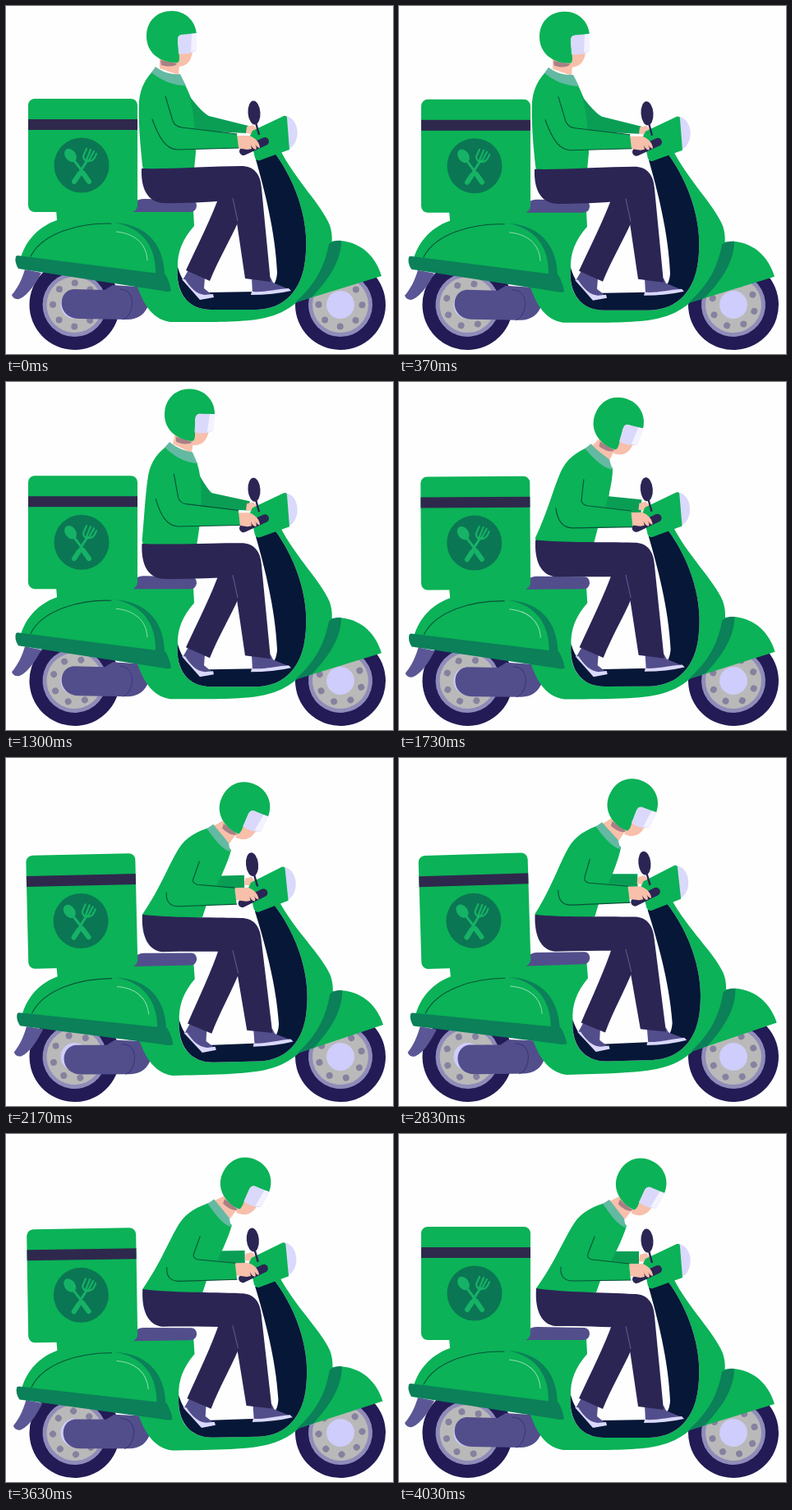
Animation of 471x424 px, one loop 4060 ms. Source, as an HTML page:

```html
<!DOCTYPE html>
<html lang="en">
<head>
<meta charset="utf-8">
<title>Scooter delivery</title>
<style>
  html, body { margin: 0; width: 100%; height: 100%; overflow: hidden; background: #fefefe; }
  svg { display: block; width: 100vw; height: 100vh; }
  .green { fill: #0bb257; }
  .shade { fill: #0b8059; }
  .far { fill: #0a9e55; }
  .navy { fill: #2b2554; }
  .metal { fill: #524e8c; }
  .pale { fill: #dad8fb; }
  .skin { fill: #f8bfaa; }
  .line { fill: none; stroke: #075238; stroke-width: 1.1; stroke-linecap: round; }
  .tool { fill: none; stroke: #16b266; stroke-linecap: round; }
</style>
</head>
<body>
<svg viewBox="0 0 471 424">
  <defs>
    <g id="wheel">
      <circle r="55" fill="#221b55"/>
      <circle r="39" fill="#8f8cba"/>
      <circle r="34" fill="#bab9b9"/>
      <circle r="26.5" fill="none" stroke="#85819f" stroke-width="8" stroke-linecap="round"
        pathLength="80" stroke-dasharray="0 10"/>
      <circle r="17" fill="#cecdfb"/>
    </g>
  </defs>

  <g class="spin" data-x="83.5" data-y="364"><use href="#wheel"/></g>
  <g class="spin" data-x="407" data-y="364"><use href="#wheel"/></g>

  <g id="ride">
    <!-- exhaust and engine -->
    <path fill="#5b5796" d="M23,321 L43,325 C37,336 28,352 16,357 Q9,358 7,352 C14,344 19,334 23,321 Z"/>
    <path class="metal" d="M82,345 L120,346 L130,340 L160,342 L174,362 C170,376 160,382 148,382 L88,381 C62,380 62,347 82,345 Z"/>
    <path fill="none" stroke="#3b3577" d="M138,345 C152,345 155,358 153,367 Q150,380 142,382"/>

    <!-- body -->
    <path class="green" d="M17,310 C22,290 36,270 62,261 L61,248 L228,249 L229,268 C215,284 208,300 209,320
      C206,350 222,370 250,370 L305,370 C340,369 360,345 364,310 C370,270 357,220 327,179 L333,174
      C352,212 384,242 394,267 C401,288 394,308 380,330 C362,356 346,373 315,380 C290,386 240,385 200,385
      C180,382 168,366 160,342 Z"/>
    <path fill="#071738" d="M209,318 C206,350 222,370 250,370 L305,370 C340,369 360,345 364,310
      C370,270 357,220 327,179 L304,187 C314,222 328,275 330,325 C329,340 322,348 305,348 L248,349
      C222,349 214,335 209,318 Z"/>
    <path class="shade" d="M132,264 C167,266 192,286 193,328 L182,326 C183,296 168,270 132,264 Z"/>
    <path class="line" d="M30,305 C45,276 90,264 128,265"/>
    <path fill="none" stroke="#8ddcae" d="M134,275 C156,277 171,289 172,310"/>
    <path class="shade" d="M14,304 L194,327 Q199,336 201,347 Q198,349 190,347 L15,320 Q10,312 12,305 Z"/>
    <path class="green" d="M394,287 L408,286 C434,289 450,306 457,329 L353,361 Z"/>
    <path class="shade" d="M393,290 Q399,285 408,286 C408,314 388,338 372,355 L352,361 C378,338 388,316 393,290 Z"/>

    <!-- seat and box -->
    <path class="metal" d="M155,251 L157,239 Q161,235 168,235 L226,236 Q232,237 232,244 Q231,251 224,251 Z"/>
    <rect class="green" x="27" y="113" width="133" height="138" rx="8"/>
    <rect x="27" y="138" width="133" height="13" fill="#2f284d"/>
    <circle fill="#0b7653" cx="92" cy="194" r="33.5"/>
    <ellipse cx="78.5" cy="182" rx="6.5" ry="9" transform="rotate(-36 78.5 182)" fill="#16b266"/>
    <path class="tool" stroke-width="3" d="M82,187 L94,203"/>
    <path class="tool" stroke-width="6" d="M94,204 L101,214"/>
    <path class="tool" stroke-width="3" d="M99,188 L90,202"/>
    <path class="tool" stroke-width="6" d="M89,205 L83,214"/>
    <path class="tool" stroke-width="2.2" d="M98,174 L94,183 Q95,190 101,189 Q107,189 110,180 M103,175 L98,187 M107,177 L101,188"/>

    <!-- rider, upper part behind the handlebar -->
    <path id="farArm" class="far"/>
    <path class="skin" d="M293,147 L301,145 L306,151 L300,156 L292,155 Z"/>
    <path class="pale" d="M341,134 C359,138 359,170 342,175 Z"/>
    <path class="green" d="M297,158 L300,152 L338,134 Q342,133 342,137 L345,175 L309,188 Q305,189 303,185 Z"/>
    <path id="neck" class="skin"/>
    <path id="jacket" class="green"/>
    <path id="collar" fill="#63b9a2"/>
    <g id="head">
      <path fill="#a97f86" d="M188,66 L209,70 Q203,76 189,72 Z"/>
      <path class="skin" d="M206,50 L227,52 C227,66 221,74 208,74 Z"/>
      <path class="green" d="M208,69 C186,69 171,56 171,37 C171,18 184,6 202,6 C218,6 231,18 232,35
        L214,35 Q209,36 209,42 L211,63 Q211,69 208,69 Z"/>
      <path class="pale" d="M213,35 L232,33 L232,54 Q222,60 210,58 L209,40 Q209,36 213,35 Z"/>
      <path fill="#f3f2ff" d="M226,34 L232,33 L232,54 L225,56 Z"/>
    </g>

    <!-- legs -->
    <path class="metal" d="M223,320 L242,331 L241,344 L252,353 L238,356 L215,334 Z"/>
    <path class="pale" d="M214,333 L218,333 C225,344 232,351 242,352 L252,351 L253,355 L236,358 Z"/>
    <path class="metal" d="M299,331 L322,331 L325,337 L344,345 L300,350 Z"/>
    <path class="pale" d="M299,348 C315,349 328,345 344,344 L347,347 Q325,352 298,352 Z"/>
    <path class="navy" d="M260,230 C250,258 234,290 219,322 L248,335 C258,310 273,285 283,262 L283,230 Z"/>
    <path id="pants" class="navy"/>
    <path fill="none" stroke="#6962a0" stroke-width=".9" d="M276,234 L282,262"/>

    <!-- handlebar, near arm and hand -->
    <ellipse class="navy" cx="302" cy="130" rx="7.5" ry="14.5" transform="rotate(-4 302 130)"/>
    <path fill="none" stroke="#2b2554" stroke-width="2.4" d="M304,142 L308,157"/>
    <path fill="none" stroke="#2b2554" stroke-width="10" stroke-linecap="round" d="M289,177 L315,165"/>
    <path class="skin" d="M280,158 L296,158 C305,161 309,168 309,173 Q306,173 303,168 Q306,173 304,175 Q300,174 298,169 L299,174 L294,175 L281,173 Z"/>
    <path id="nearArm" class="green"/>
    <path id="armTop" class="line"/>
    <path id="armBottom" class="line"/>
  </g>
</svg>
<script>
const LOOP = 4060, LEAN = 29, HIP = [202, 229];
const $ = id => document.getElementById(id);

// Each shape: upright outline, leaning outline
const shapes = {
  neck: [
    'M187,63 L211,68 L210,84 L187,76 Z',
    'M268,76 L284,92 L275,104 L256,82 Z'],
  collar: [
    'M182,74 C192,82 205,84 212,83 L219,97 C203,97 188,90 177,81 Z',
    'M256,80 C262,88 268,95 274,103 L276,114 C266,111 257,98 248,85 Z'],
  jacket: [
    'M181,77 C170,88 164,98 162,116 C161,140 163,165 166,194 L168,204 L229,199 L231,178 C230,150 229,120 218,96 Z',
    'M254,83 C236,88 222,95 213,109 C200,129 190,156 167,188 L172,200 L240,193 L246,176 C262,150 272,128 277,112 Z'],
  farArm: [
    'M219,98 L225,112 Q239,130 247,134 L295,146 L293,155 L226,152 Z',
    'M272,118 L268,127 Q262,138 257,143 L292,143 L292,162 L240,160 Z'],
  nearArm: [
    'M194,110 L207,147 L281,156 L283,173 L212,175 C195,175 186,160 178,138 Z',
    'M238,125 L229,150 L280,158 L282,178 L228,179 C212,180 198,178 197,162 Z'],
  armTop: [
    'M194,110 L203,140 Q206,147 214,148 L281,156',
    'M238,125 L230,146 Q228,151 235,153 L280,158'],
  armBottom: [
    'M178,138 C186,160 194,174 208,175 L283,173',
    'M197,162 C196,172 200,179 212,179 L282,178'],
  pants: [
    'M165,198 C200,199 250,195 286,195 C302,195 310,205 311,222 L322,336 L291,332 L277,237 C250,238 220,241 190,240 C172,238 164,222 165,198 Z',
    'M167,188 C200,193 250,193 286,195 C302,195 310,205 311,222 L322,336 L291,332 L277,236 C250,235 220,234 190,234 C174,232 165,216 167,188 Z']
};

const pairs = d => [...d.matchAll(/([\d.]+),([\d.]+)/g)].map(m => [+m[1], +m[2]]);
const parts = Object.entries(shapes).map(([id, [up, low]]) =>
  ({ el: $(id), up, from: pairs(up), to: pairs(low) }));

function turn([x, y], deg) {
  const a = deg * Math.PI / 180, c = Math.cos(a), s = Math.sin(a);
  const dx = x - HIP[0], dy = y - HIP[1];
  return [HIP[0] + dx * c - dy * s, HIP[1] + dx * s + dy * c];
}

// Swing around the hip, with the leftover offset blended in
function bend(a, b, k) {
  const now = turn(a, LEAN * k), end = turn(a, LEAN);
  return now.map((v, i) => (v + k * (b[i] - end[i])).toFixed(2)).join();
}

// The seated part blends straight
const straight = (a, b, k) => a.map((v, i) => (v + k * (b[i] - v)).toFixed(2)).join();

function ease(t, from, to) {
  const u = Math.min(1, Math.max(0, (t - from) / (to - from)));
  return u * u * (3 - 2 * u);
}

function draw(t) {
  const lean = ease(t, 900, 2200) - 0.06 * (ease(t, 2200, 2750) - ease(t, 3200, 3700));
  const tilt = -1.7 * (ease(t, 1400, 2500) - ease(t, 3250, 4050));
  const sink = 1.2 * (ease(t, 0, 600) - ease(t, 2100, 2900));

  $('ride').setAttribute('transform', `translate(0 ${sink}) rotate(${tilt} 235 235)`);
  $('head').setAttribute('transform', `rotate(${LEAN * lean} ${HIP})`);
  for (const { el, up, from, to } of parts) {
    const mix = el.id === 'pants' ? straight : bend;
    let i = 0;
    el.setAttribute('d', up.replace(/[\d.]+,[\d.]+/g, () => mix(from[i], to[i++], lean)));
  }
  for (const w of document.querySelectorAll('.spin'))
    w.setAttribute('transform', `translate(${w.dataset.x} ${w.dataset.y}) rotate(${t / LOOP * 2160})`);
}

const start = performance.now();
function tick() {
  draw((performance.now() - start) % LOOP);
  requestAnimationFrame(tick);
}
tick();
</script>
</body>
</html>
```
